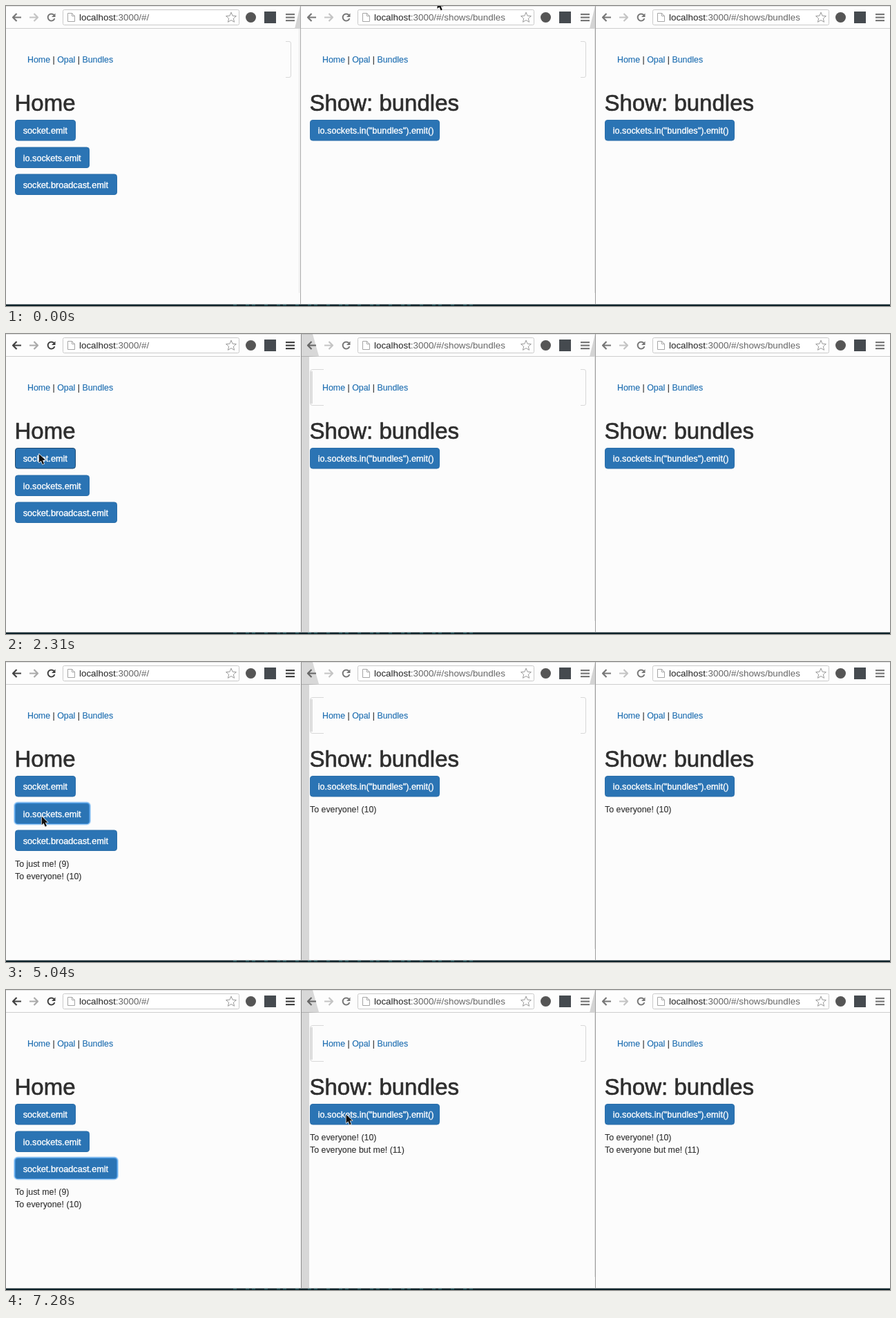
Animation, 1280 px wide and 435 px high, one loop 8 s. Source, as an HTML page with a canvas:

```html
<!DOCTYPE html>
<html lang="en">
<head>
<meta charset="utf-8">
<title>Socket demo</title>
<style>
html, body { margin: 0; width: 100%; height: 100%; overflow: hidden; background: #fcfcfc; }
canvas { display: block; }
</style>
</head>
<body>
<canvas id="stage" width="1280" height="435"></canvas>
<script>
const ctx = document.getElementById('stage').getContext('2d');
const LOOP = 8000, STEP = 70, PANEL = 427;
const BLUE = '#2b74b4', LINK = '#1f6fb2', INK = '#2e2e2e';
const FONT = '"Liberation Sans", Arial, sans-serif';

// Cursor moves: start time, number of steps, destination of the tip.
const moves = [
  [280, 4, 162, 146], [700, 7, 60, 181], [2170, 4, 45, 172], [3430, 7, 51, 217],
  [5040, 4, 52, 257], [6720, 4, 467, 180], [7070, 4, 492, 180]
];
// Buttons of the first window: label, top, width, hover start, press, release, focus end.
const homeButtons = [
  ['socket.emit', 165, 88, 2170, 2660, 2730, 4270],
  ['io.sockets.emit', 204.5, 108, 3640, 4270, 4410, 5880],
  ['socket.broadcast.emit', 243.5, 148, 5180, 5880, 6020, LOOP]
];
const between = (t, a, b) => t >= a && t < b;

function rect(x, y, w, h, color) {
  ctx.fillStyle = color;
  ctx.fillRect(x, y, w, h);
}

function shape(points, color) {
  ctx.fillStyle = color;
  ctx.beginPath();
  points.forEach(p => ctx.lineTo(...p));
  ctx.closePath();
  ctx.fill();
}

function path(d, color, width = 1) {
  ctx.strokeStyle = color;
  ctx.lineWidth = width;
  ctx.stroke(new Path2D(d));
}

function box(x, y, w, h, r, fill, border, width = 1) {
  ctx.beginPath();
  ctx.roundRect(x, y, w, h, r);
  if (fill) { ctx.fillStyle = fill; ctx.fill(); }
  if (border) { ctx.strokeStyle = border; ctx.lineWidth = width; ctx.stroke(); }
}

// Draws text and returns the x where it ends; weight thickens the strokes.
function text(str, x, y, size, color, weight = 0) {
  ctx.font = `${size}px ${FONT}`;
  ctx.fillStyle = color;
  ctx.fillText(str, x, y);
  if (weight) {
    ctx.strokeStyle = color;
    ctx.lineWidth = weight;
    ctx.lineJoin = 'round';
    ctx.strokeText(str, x, y);
  }
  return x + ctx.measureText(str).width;
}

function button(label, x, y, w, { hover, pressed, focus } = {}) {
  if (focus) {
    box(x - .5, y - .5, w + 1, 31, 4.5, null, '#b5d7f5', 3);
    box(x, y, w, 30, 4, null, '#5ba6ea', 1.5);
  }
  box(x + .5, y + .5, w - 1, 29.5, 3.5, pressed ? '#1f4e79' : BLUE,
    focus ? (pressed ? '#2f80cd' : '#3f8dd6') : hover ? '#1d4a73' : '#296da9');
  text(label, x + 11.7, y + 20, 12.7, '#fff', .35);
}

function toolbar(url, active) {
  const dark = active ? '#414141' : '#777', pale = active ? '#aaa' : '#c4c4c4';
  rect(0, 0, 426, 32, '#fdfdfd');
  rect(0, 0, 426, 1, '#e2e2e2');
  rect(0, 32, 426, 1, '#cecece');
  path('M22 16.5H11M15.5 11 10 16.5 15.5 22', dark, 2.2);
  path('M34 16.5H45M40.5 11 46 16.5 40.5 22', pale, 2.2);
  path('M69.5 13.2A5 5 0 1 0 70.4 18', dark, 2);
  shape([[71.5, 10.5], [71.5, 16], [66, 16]], dark);
  box(82.5, 5.5, 255, 22, 2, '#fff', '#c9c9c9');
  path('M89.5 10.5H95.5L99.5 14.5V22.5H89.5ZM95.5 10.5V14.5H99.5', '#a5a5a5');
  const end = text('localhost', 106, 21, 13.4, '#222');
  text(url, end, 21, 13.4, '#666');

  const star = Array.from({ length: 10 }, (_, i) => {
    const a = i * Math.PI / 5, r = i % 2 ? 3.5 : 7.8;
    return `${326 + r * Math.sin(a)} ${17 - r * Math.cos(a)}`;
  });
  path(`M${star.join('L')}Z`, '#999');
  ctx.fillStyle = '#555';
  ctx.beginPath();
  ctx.arc(354.5, 16.5, 7.5, 0, 7);
  ctx.fill();
  rect(374, 8, 17, 17, '#454a4f');
  for (const y of [11, 15.5, 20]) rect(405, y, 13, 2.2, dark);
}

function page(title, url, active) {
  rect(0, 0, PANEL, 433, '#fcfcfc');
  toolbar(url, active);
  let x = 31;
  ['Home', ' | ', 'Opal', ' | ', 'Bundles'].forEach((word, i) => {
    x = text(word, x, 82, 12.4, i % 2 ? '#333' : LINK, .15);
  });
  text(title, 12.5, 151.5, 33, INK, .7);
}

function navEnd() {
  path('M405 51.5H410Q412.5 51.5 412.5 54V101Q412.5 103.5 410 103.5H405', '#d8d8d8');
}

function messages(y, lines) {
  lines.forEach((line, i) => text(line, 13, y + 18 * i, 12.4, INK, .1));
}

function homePage(t, active) {
  page('Home', ':3000/#/', active);
  for (const [label, y, w, hover, press, release, blur] of homeButtons) {
    button(label, 13, y, w, {
      hover: between(t, hover, press),
      pressed: between(t, press, release),
      focus: between(t, press, blur)
    });
  }
  const lines = [];
  if (t >= 2730) lines.push('To just me! (9)');
  if (t >= 4410) lines.push('To everyone! (10)');
  messages(296.5, lines);
  if (!active) {
    navEnd();
    shape([[418, 33], [426, 0], [426, 33]], '#d4d4d4');
    rect(424, 33, 1, 383, '#e6e6e6');
  }
  rect(active ? 427 : 426, 0, 1, 433, active ? '#8c8c8c' : '#a8a8a8');
}

function showPage(t, index, shaded) {
  ctx.save();
  ctx.translate(PANEL * index, 0);
  page('Show: bundles', ':3000/#/shows/bundles', false);
  button('io.sockets.in("bundles").emit()', 13, 165, 188);
  const lines = [];
  if (t >= 4410) lines.push('To everyone! (10)');
  if (t >= 6020) lines.push('To everyone but me! (11)');
  messages(218, lines);
  if (index === 1) {
    navEnd();
    shape([[418, 33], [426, 0], [426, 33]], '#d4d4d4');
    rect(425, 33, 1, 383, '#e4e4e4');
    rect(426, 0, 1, 433, '#9c9c9c');
  }
  if (shaded) {
    ctx.globalCompositeOperation = 'multiply';
    shape([[0, 0], [17, 0], [26, 32], [12, 33], [12, 433], [0, 433]], '#dadada');
    ctx.globalCompositeOperation = 'source-over';
    path('M33 51.5H17Q13.5 51.5 13.5 55V100Q13.5 103.5 17 103.5H33', '#d8d8d8');
    rect(14, 54, 3, 47, '#dedede');
  }
  ctx.restore();
}

function desktopEdge() {
  rect(0, 432, 1280, 1, '#9a9fa1');
  rect(0, 433, 1280, 2, '#0c2229');
  for (let x = 320; x < 680; x += 9) {
    if ((x * 7) % 5 > 1) rect(x, 433, 5, 1, '#2c6a70');
  }
}

function cursor(t) {
  let x = 624, y = -9;
  for (const [start, steps, toX, toY] of moves) {
    if (t < start) break;
    const p = Math.min(1, (Math.floor((t - start) / STEP) + 1) / steps);
    const ease = p * p * (3 - 2 * p);
    x += (toX - x) * ease;
    y += (toY - y) * ease;
  }
  ctx.save();
  ctx.translate(x, y);
  const arrow = [[.5, .5], [.5, 13], [3.4, 10.4], [5.6, 15.5], [7.8, 14.6], [5.7, 9.6], [9.6, 9.4]];
  path(`M${arrow.join('L')}Z`, '#fff', 1.4);
  shape(arrow, '#111');
  ctx.restore();
}

function draw(now) {
  const t = now % LOOP, active = t >= 1330;
  showPage(t, 2, false);
  showPage(t, 1, active);
  homePage(t, active);
  desktopEdge();
  cursor(t);
}

const origin = performance.now();
function frame() {
  draw(performance.now() - origin);
  requestAnimationFrame(frame);
}
frame();
</script>
</body>
</html>
```
